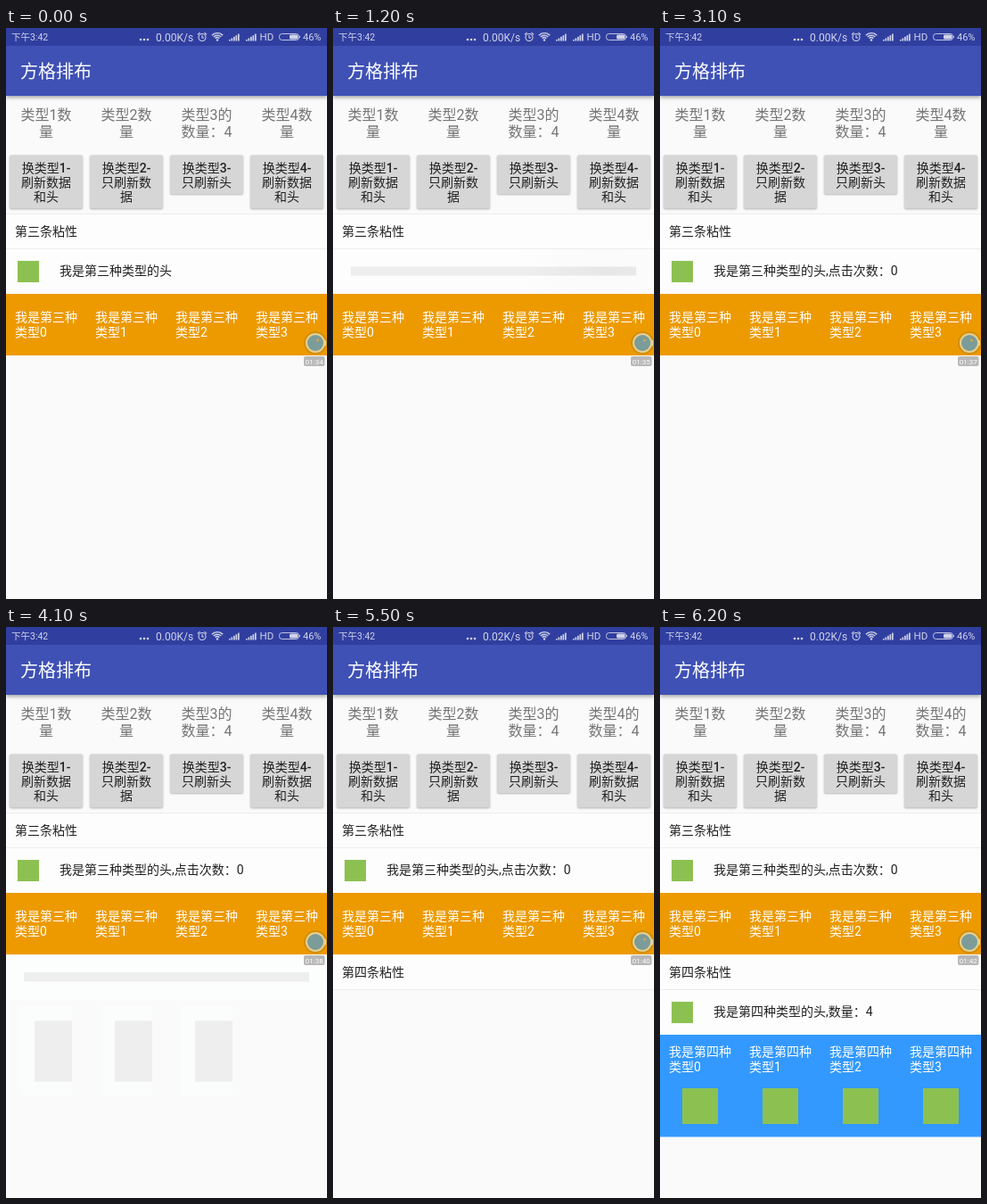
Write an HTML page with a canvas that moves like this. It is 360 px wide and 640 px high and loops after 6.3 s.

```html
<!DOCTYPE html>
<html lang="zh-CN">
<head>
<meta charset="utf-8">
<title>方格排布</title>
<style>
html, body { margin: 0; width: 100%; height: 100%; overflow: hidden; background: #fafafa; }
canvas { display: block; width: 360px; height: 640px; }
</style>
</head>
<body>
<canvas id="stage"></canvas>
<script>
const LOOP = 6300, STEP = 100;
const HEAD3 = { from: 700, to: 2700 };
const LIST4 = { from: 3300, to: 5300 };
const TICKS = [200, 1300, 2200, 3200, 4300, 5200, 5700, 6100];
const DARK = '#212121', GREEN = '#8cc152', LINE = '#ededed';
const FAMILY = 'Roboto, "Noto Sans CJK SC", "Noto Sans CJK", sans-serif';

const canvas = document.getElementById('stage');
const ctx = canvas.getContext('2d');
const dpr = window.devicePixelRatio || 1;
canvas.width = 360 * dpr;
canvas.height = 640 * dpr;

const within = (t, span) => t >= span.from && t < span.to;

function rect(x, y, w, h, color) {
  ctx.fillStyle = color;
  ctx.fillRect(x, y, w, h);
}

function round(x, y, w, h, r, color) {
  ctx.beginPath();
  ctx.roundRect(x, y, w, h, r);
  ctx.fillStyle = color;
  ctx.fill();
}

function disc(x, y, r, color) {
  ctx.beginPath();
  ctx.arc(x, y, r, 0, Math.PI * 2);
  ctx.fillStyle = color;
  ctx.fill();
}

// y is the baseline
function text(str, x, y, size, color, align = 'left', weight = 400) {
  ctx.font = `${weight} ${size}px ${FAMILY}`;
  ctx.textAlign = align;
  ctx.fillStyle = color;
  ctx.fillText(str, x, y);
}

function signal(x) {
  for (let i = 0; i < 5; i++) {
    const h = 1.5 + i * 1.6;
    rect(x + i * 2.5, 14.5 - h, 1.7, h, '#d0d3ea');
  }
}

function statusBar(t) {
  const ink = '#d0d3ea';
  rect(0, 0, 360, 20, '#303f9f');
  text('下午3:42', 6, 14, 10.5, ink);
  for (let i = 0; i < 3; i++) disc(151 + i * 4, 13, 1.3, ink);
  text(t < 4600 ? '0.00K/s' : '0.02K/s', 168, 15, 12, ink);

  ctx.strokeStyle = ink;
  ctx.lineWidth = 1.1;
  ctx.beginPath();
  ctx.arc(220, 10.5, 4, 0, Math.PI * 2);
  ctx.moveTo(220, 8);
  ctx.lineTo(220, 11);
  ctx.lineTo(222, 11);
  ctx.moveTo(215, 7.5);
  ctx.lineTo(217.5, 5.2);
  ctx.moveTo(225, 7.5);
  ctx.lineTo(222.5, 5.2);
  ctx.stroke();

  ctx.lineWidth = 1.4;
  for (const r of [3.2, 5.8, 8.4]) {
    ctx.beginPath();
    ctx.arc(237, 14, r, -Math.PI * 0.76, -Math.PI * 0.24);
    ctx.stroke();
  }
  disc(237, 13.5, 1.2, ink);

  signal(250);
  signal(269);
  text('HD', 284.5, 14, 11.5, ink);

  ctx.lineWidth = 0.9;
  ctx.beginPath();
  ctx.roundRect(306.5, 6.5, 22, 7, 3);
  ctx.stroke();
  round(318, 7.5, 9.5, 5, 1.5, ink);
  rect(329, 9, 0.8, 2, ink);
  text('46%', 333, 14, 11, ink);
}

function toolbar() {
  ctx.save();
  ctx.shadowColor = 'rgba(0,0,0,.35)';
  ctx.shadowBlur = 4 * dpr;
  ctx.shadowOffsetY = 1.5 * dpr;
  rect(0, 20, 360, 56, '#3f51b5');
  ctx.restore();
  text('方格排布', 16, 56, 20, '#fff', 'left', 500);
}

function counters(t) {
  for (let i = 0; i < 4; i++) {
    const x = 45 + i * 90;
    const known = i === 2 || (i === 3 && t >= LIST4.to);
    text(`类型${i + 1}${known ? '的' : '数'}`, x, 103, 16, '#757575', 'center');
    text(known ? '数量：4' : '量', x, 122, 16, '#757575', 'center');
  }
}

function buttons() {
  const labels = [
    ['换类型1-', '刷新数据', '和头'],
    ['换类型2-', '只刷新数', '据'],
    ['换类型3-', '只刷新头'],
    ['换类型4-', '刷新数据', '和头']
  ];
  labels.forEach((lines, i) => {
    ctx.save();
    ctx.shadowColor = 'rgba(0,0,0,.3)';
    ctx.shadowBlur = 2 * dpr;
    ctx.shadowOffsetY = 0.7 * dpr;
    round(4 + i * 90, 142.5, 82, 11.5 + lines.length * 16.2, 2, '#d6d6d6');
    ctx.restore();
    lines.forEach((line, n) =>
      text(line, 45 + i * 90, 162 + n * 16, 14, DARK, 'center', 500));
  });
}

function sticky(str, y) {
  rect(0, y, 360, 39, '#fdfdfd');
  rect(0, y + 39, 360, 1, LINE);
  text(str, 10, y + 25, 14, DARK);
}

function head(str, y) {
  rect(0, y, 360, 50, '#fdfdfd');
  rect(13, y + 13, 24, 24, GREEN);
  text(str, 60, y + 29, 14, DARK);
}

function cells(name, y, h, color, baseline) {
  rect(0, y, 360, h, color);
  for (let i = 0; i < 4; i++) {
    text(`我是第${name}种`, 10 + i * 90, baseline, 14, '#fff');
    text(`类型${i}`, 10 + i * 90, baseline + 17, 14, '#fff');
  }
}

// Soft slanted band sweeping left to right
function shimmer(x, y, w, h, age, tone) {
  const mid = -180 + 870 * (age % 900) / 900;
  const g = ctx.createLinearGradient(mid - 90, y, mid + 90, y + 30);
  g.addColorStop(0, `rgba(${tone},0)`);
  g.addColorStop(0.5, `rgba(${tone},.07)`);
  g.addColorStop(1, `rgba(${tone},0)`);
  rect(x, y, w, h, g);
}

function bone(x, y, w, h, age) {
  rect(x, y, w, h, '#eeeeee');
  shimmer(x, y, w, h, age, '135,135,135');
}

function bonesHead(y, age) {
  rect(0, y, 360, 50, '#fdfdfd');
  shimmer(0, y, 360, 50, age, '215,215,215');
  bone(20, y + 19.5, 320, 10, age);
}

function bonesList(age) {
  rect(0, 367, 360, 51, '#fcfdfd');
  bone(20, 387, 320, 10.5, age);
  for (let i = 0; i < 3; i++) {
    const x = 16 + i * 90;
    rect(x, 425, 58, 100, '#fbfcfc');
    bone(x + 16, 441.5, 42, 68, age);
  }
}

function section3(t) {
  sticky('第三条粘性', 208);
  rect(0, 208, 360, 1, LINE);
  if (within(t, HEAD3)) bonesHead(248, t - HEAD3.from);
  else head('我是第三种类型的头' + (t < HEAD3.to ? '' : ',点击次数：0'), 248);
  cells('三', 298, 69, '#ed9a00', 329);
}

function section4(t) {
  if (within(t, LIST4)) bonesList(t - LIST4.from);
  if (t < LIST4.to) return;
  sticky('第四条粘性', 367);
  const shown = Math.max(0, Math.min(1, (t - 5550) / 120));
  if (!shown) return;
  ctx.save();
  ctx.globalAlpha = shown;
  head('我是第四种类型的头,数量：4', 407);
  cells('四', 457, 114.5, '#3399ff', 481);
  for (let i = 0; i < 4; i++) rect(25 + i * 90, 517, 40, 40, GREEN);
  ctx.restore();
}

function recorder(t) {
  disc(347, 353, 13, 'rgba(150,115,35,.3)');
  round(354, 349.5, 5, 7, 1.5, '#e9d9a6');
  disc(347, 353, 11, '#e6cf90');
  disc(347, 353, 9, '#7b9c98');
  if (t < 4000 || (t >= 4300 && t < 6100)) disc(349.5, 350, 1.6, '#d0a650');
  const secs = 34 + TICKS.filter(at => t >= at).length;
  round(334, 368, 23.5, 11, 2, '#b8b8b8');
  text(`01:${secs}`, 345.7, 377, 8, '#fff', 'center');
}

function draw(now) {
  const t = Math.floor((now % LOOP) / STEP) * STEP;
  ctx.setTransform(dpr, 0, 0, dpr, 0, 0);
  rect(0, 0, 360, 640, '#fafafa');
  toolbar();
  statusBar(t);
  counters(t);
  buttons();
  section3(t);
  section4(t);
  recorder(t);
}

const start = performance.now();
function frame() {
  draw(performance.now() - start);
  requestAnimationFrame(frame);
}
frame();
</script>
</body>
</html>
```
